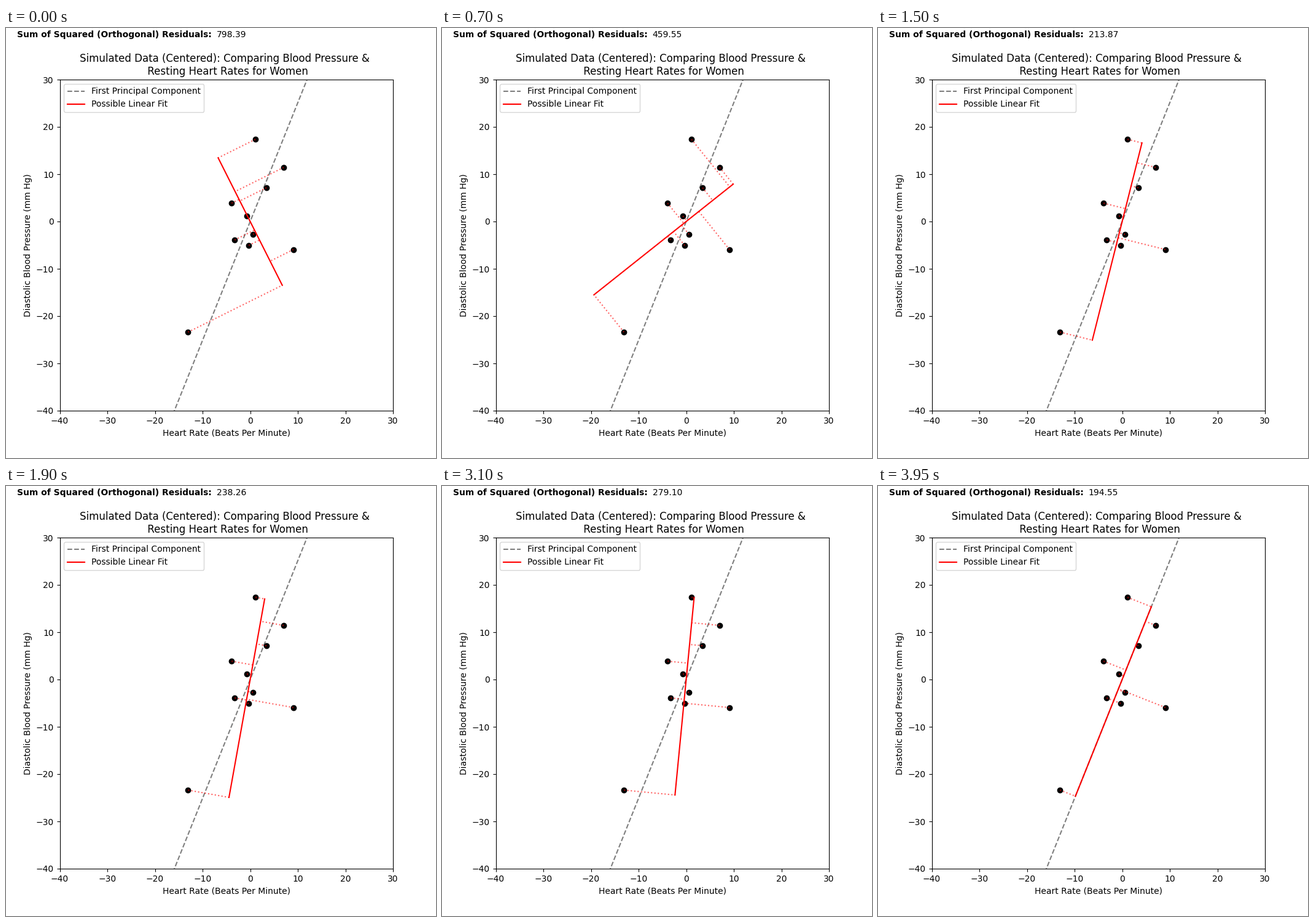
These frames come from a looping animation (700x700 px, 5 s). A matplotlib script:

```python
import numpy as np
import matplotlib.pyplot as plt
from matplotlib.animation import FuncAnimation

STEP_MS = 50
FRAMES = 100     # one 5 s loop
SWEEP = 79       # steps of the slope sweep before the final hold

# Centered sample: heart rate, diastolic pressure
data = np.array([
    [1.11, 7.045, 3.432, -3.923, -0.697, 0.594, -3.277, -0.31, 9.11, -13.084],
    [17.403, 11.429, 7.143, 3.896, 1.169, -2.727, -3.896, -5.065, -5.974, -23.377],
])
data -= data.mean(axis=1, keepdims=True)

# Adjust the sample so its scatter matrix is exact
scatter = np.array([[342.870, 372.547], [372.547, 1130.303]])
chol = np.linalg.cholesky
data = chol(scatter) @ np.linalg.inv(chol(data @ data.T)) @ data
xs, ys = data

axis = np.linalg.eigh(scatter)[1][:, -1]
pc_slope = axis[1] / axis[0]

fig, ax = plt.subplots(figsize=(7, 7), dpi=100)
ax.set_xlim(-40, 30)
ax.set_ylim(-40, 30)
ax.set_xlabel("Heart Rate (Beats Per Minute)")
ax.set_ylabel("Diastolic Blood Pressure (mm Hg)")
ax.set_title("Simulated Data (Centered): Comparing Blood Pressure & \n"
             " Resting Heart Rates for Women")

ends = np.array([-40, 30])
ax.scatter(xs, ys, color="black")
ax.plot(ends, pc_slope * ends, "--", color="black", alpha=0.5,
        label="First Principal Component")
fit, = ax.plot([], [], color="red", label="Possible Linear Fit")
residuals = [ax.plot([], [], ":", color="red", alpha=0.6)[0] for _ in xs]
ax.legend(loc="upper left")

fig.text(17.5 / 700, 685 / 700, "Sum of Squared (Orthogonal) Residuals:",
         weight="bold")
total = fig.text(342.5 / 700, 685 / 700, "")


def slope_at(step):
    return -2 + 0.2 * step if step < SWEEP else pc_slope


def update(step):
    m = slope_at(step)
    px = (xs + m * ys) / (1 + m * m)
    py = m * px
    span = np.array([px.min(), px.max()])
    fit.set_data(span, m * span)
    for line, x, y, u, v in zip(residuals, xs, ys, px, py):
        line.set_data([x, u], [y, v])
    total.set_text(f"{np.sum((xs - px) ** 2 + (ys - py) ** 2):.2f}")
    return [fit, total, *residuals]


anim = FuncAnimation(fig, update, frames=FRAMES, interval=STEP_MS,
                     init_func=lambda: update(0), repeat=True, repeat_delay=0)
plt.show()
```
